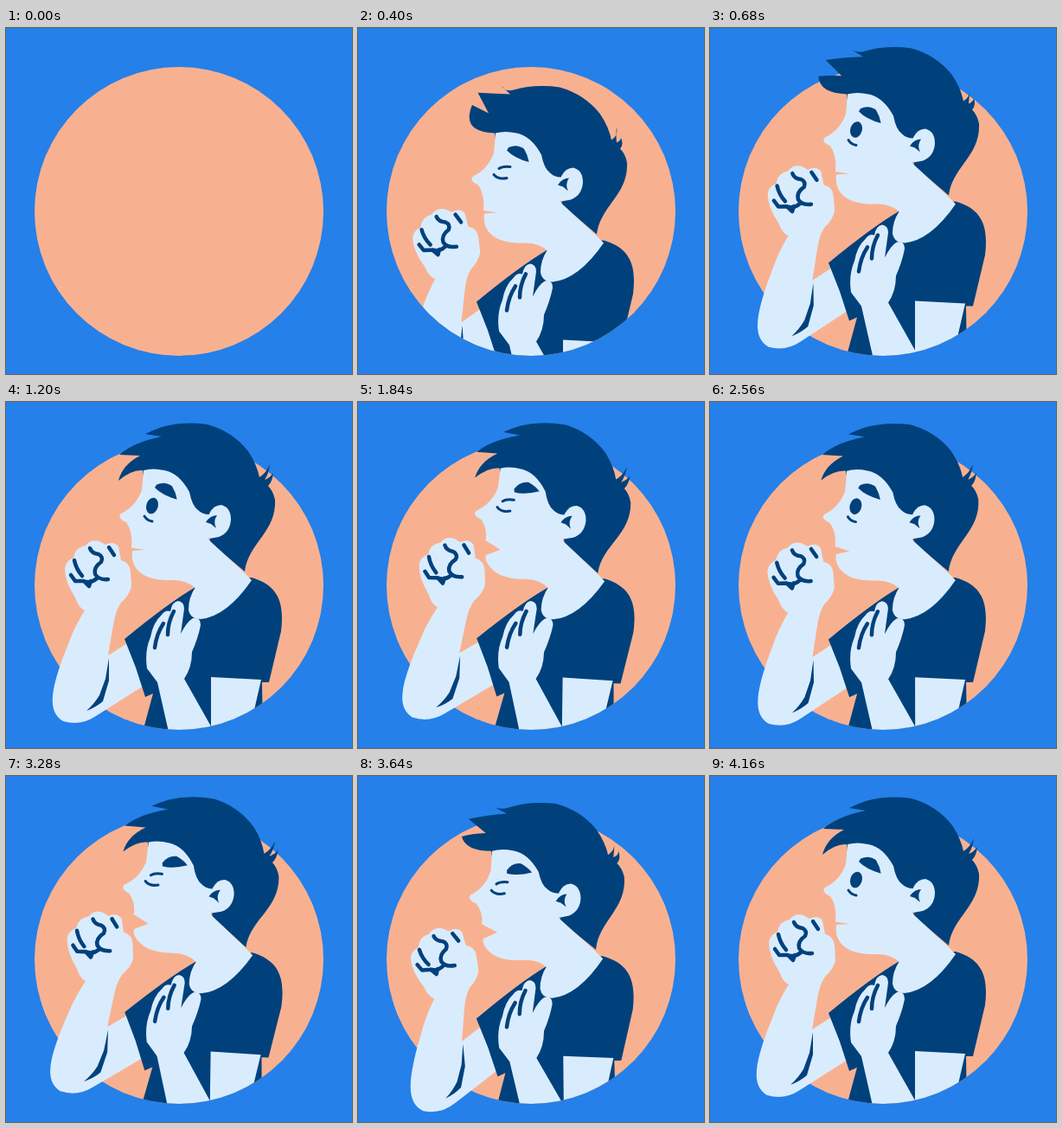
Write an HTML page that moves like this. It is 400 px wide and 400 px high and loops after 4520 ms.

```html
<!DOCTYPE html>
<html lang="en">
<head>
<meta charset="utf-8">
<title>Coughing boy</title>
<style>
  html, body { margin: 0; width: 100%; height: 100%; overflow: hidden; background: #2580e9; }
  svg { display: block; width: 100vw; height: 100vh; }
  .skin { fill: #d9ecfe; }
  .dark { fill: #00417c; }
  .line { fill: none; stroke: #00417c; stroke-width: 4.5; stroke-linecap: round; stroke-linejoin: round; }
  .thin { stroke-width: 3; }
</style>
</head>
<body>
<svg viewBox="0 0 400 400">
  <defs>
    <clipPath id="window"><path d="M0-200H400V212H367A167 167 0 0 1 33 212H0Z"/></clipPath>
  </defs>
  <rect width="400" height="400" fill="#2580e9"/>
  <circle cx="200" cy="212" r="167" fill="#f8b190"/>

  <g id="armClip">
    <g id="arm">
      <path class="skin" d="M68 192Q69 184 78 180Q80 168 92 166Q98 158 108 161L115 165Q124 160 130 167L133 183
        Q143 185 144 196L145 213Q143 223 133 232Q127 240 124 258L118 293L145 276L175 318L104 363
        Q86 375 66 369Q52 361 54 340Q55 325 66 295L77 267Q84 252 91 241Q84 238 80 226Q68 208 68 192Z"/>
      <path class="dark" d="M119 296L119 322L112 346Q104 353 93 357Q102 349 108 339L115 320Z"/>
      <path class="line" d="M79 183Q81 193 88 201M75 200L80 207L90 207L96 213L98 207M97 169Q99 175 107 176
        Q113 179 110 185Q101 191 103 199Q107 206 118 205M90 207Q98 210 105 204M119 168L125 177"/>
    </g>
  </g>

  <g clip-path="url(#window)">
    <path class="torso dark" d="M219 214Q188 232 137 274L150 307L161 341L170 337L157 385H297L296 324L304 324L318 265
      C322 232 315 212 284 203L250 205Z"/>
    <path id="hair" class="head dark"/>
    <g class="torso">
      <path class="skin" d="M217 200L219 214Q211 226 211 240Q213 251 225 251Q255 248 284 206L275 197L234 159L222 150Z"/>
      <path class="skin" d="M237 318L295 321L287 356V385H237Z"/>
      <path class="skin" d="M175 324L163 308Q160 288 167 272Q170 255 180 246Q184 240 190 242Q192 231 199 230
        Q206 231 206 239L202 268Q209 254 216 250Q225 248 225 258Q222 273 215 289Q215 307 206 320L237 375V390H190Z"/>
      <path class="line" d="M182 256Q174 268 172 284M194 242Q187 255 187 269"/>
    </g>
    <g class="head">
      <path id="face" class="skin"/>
      <path class="skin" d="M230 150L235 129Q240 119 249 119Q260 122 260 136Q259 151 246 156L235 158Z"/>
      <path class="dark" d="M231 139Q236 131 244 131Q239 138 243 146L237 141Z"/>
      <path id="brow" class="dark" d="M-14 0Q-8-9 2-8Q10-4 15 2Q-2 7-14 4Z"/>
      <g id="openEye">
        <ellipse class="dark" rx="6.800" ry="9.500" transform="translate(169 120) rotate(16)"/>
        <path class="line thin" d="M160 132Q163 137 169 138"/>
      </g>
      <path id="shutEye" class="line thin" d="M163 120Q167 117 176 118M157 127Q162 133 172 131"/>
    </g>
  </g>
</svg>
<script>
const LOOP = 4520, TICK = 40;
const COUGHS = [1520, 2920], COUGH_LENGTH = 1240;
const FRINGE = [{ x: 160, y: 70, dx: -30, dy: 21 }, { x: 163, y: 54, dx: -32, dy: 7 }, { x: 185, y: 38, dx: -24, dy: -1 }];
const $ = id => document.getElementById(id);
const clamp = k => Math.min(1, Math.max(0, k));

// Smooth rise from 0 to 1 between two times
function ramp(t, from, to) {
  const k = clamp((t - from) / (to - from));
  return k * k * (3 - 2 * k);
}

// Tip of a fringe lock swung upwards about its root; lower locks swing further
function lockTip({ x, y, dx, dy }, index, fling) {
  const turn = fling * (75 - 21 * index) * Math.PI / 180;
  const c = Math.cos(turn), s = Math.sin(turn);
  return [x + dx * c - dy * s, y + dx * s + dy * c];
}

function hairPath(fling) {
  const [low, mid, high] = FRINGE.map((lock, i) => lockTip(lock, i, fling));
  const sag = 1 - fling;
  const notch = (tip, x, y) => {
    const end = [x - 4 * fling, y - 6 * fling];
    return `Q${(tip[0] + end[0]) / 2 - 8 * sag} ${(tip[1] + end[1]) / 2 - 4 * sag} ${end}`;
  };
  const swing = -6 * fling;
  return `M158 79Q${145 - 26 * fling} 78 ${low}${notch(low, 155, 62)}L${mid}${notch(mid, 180, 40)}L${high}
    Q171 32 180 29Q205 22 233 26Q262 34 280 57Q290 72 293 87Q301 82 ${305 + swing} 72Q${304 + swing} 82 299 90
    Q306 87 ${309 + swing} 82Q308 92 303 97Q309 103 311 113C313 150 280 163 276 196L236 162L233 140L200 125L160 95Z`;
}

function facePath(open) {
  return `M159 79Q170 76 183 79Q200 82 212 104Q215 120 222 125Q227 130 235 130L234 159L232 212L219 215
    Q209 206 193 206Q167 207 155 197Q144 188 146 ${172 + 8 * open}L${161 + 1.5 * open} ${171 + 2 * open}
    L145 ${168.5 - 5.5 * open}Q147 150 139 139Q128 134 133 129Q150 121 157 102Z`;
}

function entrance(t) {
  return {
    y: 358 * (1 - clamp(t / 810)) ** 3 - 4 * (1 - ramp(t, 810, 1120)),
    lean: 0,
    arm: 1.8 * (1 - ramp(t, 440, 800)),
    fling: 1 - ramp(t, 440, 1120),
    mouth: 0,
    squint: 0,
    shut: t < 640
  };
}

function cough(t) {
  const inhale = ramp(t, 0, 360) - ramp(t, 400, 560);
  const thrust = ramp(t, 400, 640) - ramp(t, 760, 1160);
  return {
    y: 6 * thrust ** 2,
    lean: inhale - 0.7 * thrust,
    arm: 2.7 * thrust - inhale,
    fling: 0.65 * thrust ** 2,
    mouth: ramp(t, 0, 320) - ramp(t, 840, 1200),
    squint: ramp(t, 0, 280) - ramp(t, 680, 880),
    shut: t >= 160 && t < 840
  };
}

function poseAt(t) {
  const start = COUGHS.find(s => t >= s && t < s + COUGH_LENGTH);
  return start === undefined ? entrance(t) : cough(t - start);
}

function place(selector, y, angle, pivot) {
  document.querySelectorAll(selector).forEach(el =>
    el.setAttribute("transform", `translate(0 ${y}) rotate(${angle} ${pivot})`));
}

function draw(t) {
  const { y, lean, arm, fling, mouth, squint, shut } = poseAt(t);
  place(".torso", y, 0.8 * lean, "200 290");
  place(".head", y, 2.2 * lean, "225 230");
  place("#arm", y + 3.5 * arm, -2 * arm, "100 270");
  $("armClip").setAttribute("clip-path", t < 520 ? "url(#window)" : "none");

  $("hair").setAttribute("d", hairPath(fling));
  $("face").setAttribute("d", facePath(mouth));
  $("brow").setAttribute("transform", `translate(${186 + 4 * squint} ${103 - squint}) rotate(${32 * (1 - squint)})`);
  $("shutEye").setAttribute("transform", `translate(0 ${-3 * squint})`);
  $("openEye").style.display = shut ? "none" : "";
  $("shutEye").style.display = shut ? "" : "none";
}

const begin = performance.now();
function frame(now) {
  const t = Math.max(0, now - begin) % LOOP;
  draw(Math.floor(t / TICK) * TICK);
  requestAnimationFrame(frame);
}
draw(0);
requestAnimationFrame(frame);
</script>
</body>
</html>
```
